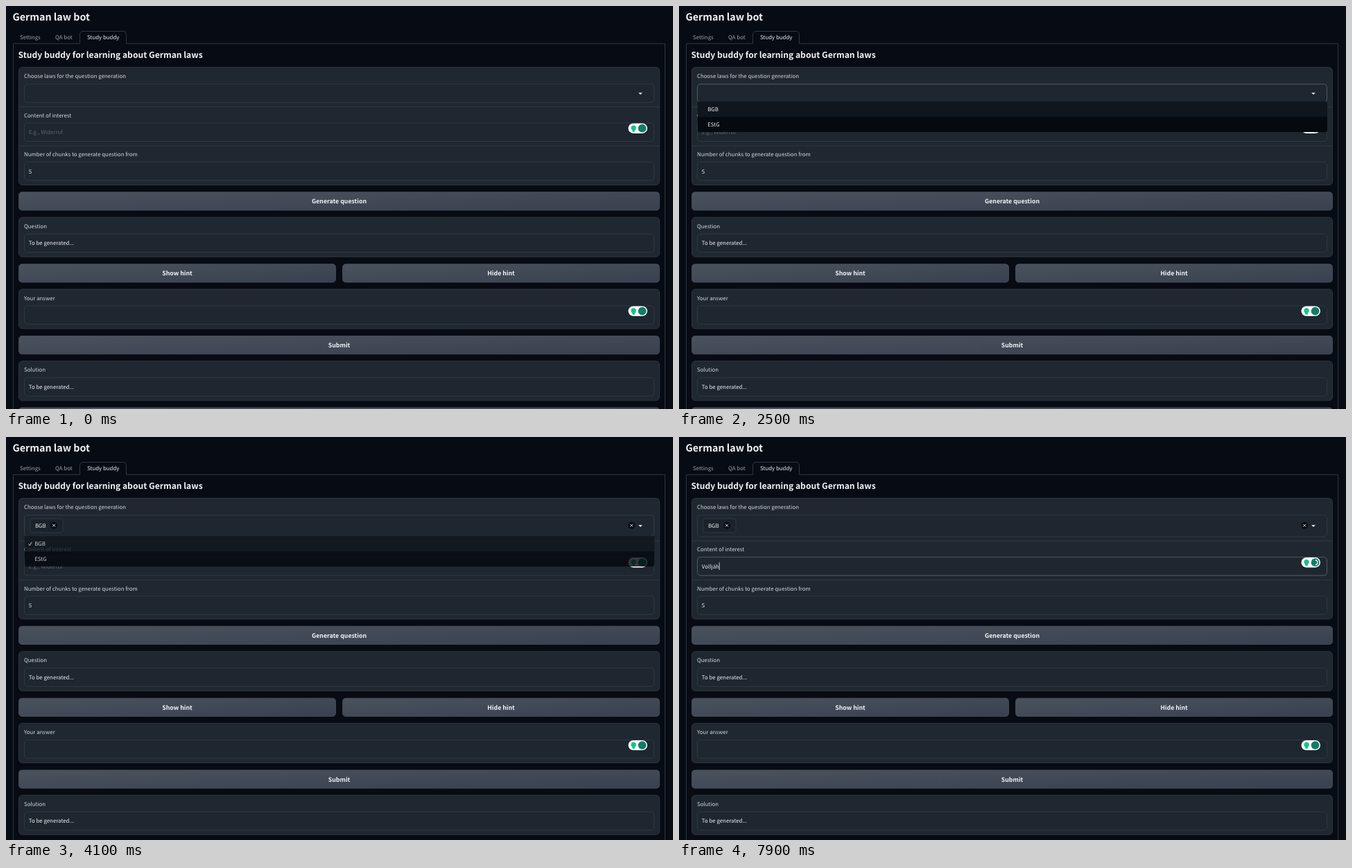
An HTML page that plays this animation: 962x582 px, repeating every 8000 ms.

```html
<!DOCTYPE html>
<html lang="en">
<head>
<meta charset="utf-8">
<title>German law bot</title>
<style>
  html, body { margin: 0; width: 100%; height: 100%; overflow: hidden; background: #070b14; }
  svg { display: block; width: 100vw; height: 100vh; }
  text {
    font-family: "Noto Sans CJK JP", "Noto Sans CJK SC", "Noto Sans CJK KR", "Noto Sans CJK TC", "Noto Sans CJK", "Noto Sans", sans-serif;
    font-size: 7.86px; fill: #eceef1; text-rendering: geometricPrecision; white-space: pre;
  }
  .label { fill: #d3d6db; }
  .muted { fill: #9aa1ac; }
  .hint { fill: #5d646e; }
  .bold { font-weight: 700; fill: #f1f3f5; }
  .mid { text-anchor: middle; font-size: 8.78px; }
</style>
</head>
<body>
<svg id="stage" viewBox="0 0 962 582" xmlns="http://www.w3.org/2000/svg">
  <defs>
    <linearGradient id="btn" x1="0" y1="0" x2="1" y2="1">
      <stop offset="0" stop-color="#4a525d"/>
      <stop offset="1" stop-color="#394150"/>
    </linearGradient>
  </defs>
</svg>
<script>
const NS = 'http://www.w3.org/2000/svg';
const stage = document.getElementById('stage');
const LOOP = 8000, STEP = 100;
const SHIFT = 4.5;
const BLOCK = '#1f2730', FIELD = '#1e262f', LINE = '#353d48', FOCUS = '#566070';
const LEFT = 18.5, WIDTH = 924, FIELD_X = 26.5, FIELD_W = 908, FIELD_H = 26.5;

function add(parent, tag, attrs = {}, content) {
  const node = document.createElementNS(NS, tag);
  set(node, attrs);
  if (content !== undefined) node.textContent = content;
  parent.appendChild(node);
  return node;
}
function set(node, attrs) {
  for (const key in attrs) node.setAttribute(key, attrs[key]);
}
const show = (node, on) => set(node, { visibility: on ? 'visible' : 'hidden' });
const group = (parent = stage) => add(parent, 'g');
const text = (parent, x, y, content, cls = '') => add(parent, 'text', { x, y, class: cls }, content);
const box = (parent, x, y, width, height, rx, fill, stroke = LINE) =>
  add(parent, 'rect', { x, y, width, height, rx, fill, stroke, 'stroke-width': 0.8 });
const field = (parent, y) => box(parent, FIELD_X, y, FIELD_W, FIELD_H, 4.5, FIELD);
const focusRing = (parent, y, height) => box(parent, FIELD_X, y, FIELD_W, height, 4.5, 'none', FOCUS);
const caret = (parent, y) => add(parent, 'rect', { y, width: 0.9, height: 11, fill: '#d5d8dc' });

function button(parent, x, y, width, label) {
  box(parent, x, y, width, 26.3, 4.5, 'url(#btn)', '#48505b');
  text(parent, x + width / 2, y + 16.6, label, 'bold mid');
}

function card(parent, y, label, value) {
  box(parent, LEFT, y, WIDTH, 57, 5, BLOCK);
  text(parent, 26, y + 15.6, label, 'label');
  field(parent, y + 24);
  text(parent, 32.8, y + 40.1, value);
}

// Writing helper badge: bulb and a plain round mark
function badge(parent, y) {
  const g = add(parent, 'g', { transform: `translate(897.5 ${y})` });
  add(g, 'rect', { width: 27.5, height: 14.4, rx: 7.2, fill: '#fff' });
  add(g, 'circle', { cx: 7.6, cy: 6.6, r: 3.7, fill: '#17c08f' });
  add(g, 'rect', { x: 5.9, y: 9.4, width: 3.4, height: 2.9, rx: 0.8, fill: '#17c08f' });
  add(g, 'circle', { cx: 20.1, cy: 7.2, r: 5.9, fill: '#107d67' });
  return g;
}

function closeDot(parent, x, y) {
  add(parent, 'circle', { cx: x, cy: y, r: 5, fill: '#070b13' });
  add(parent, 'path', {
    d: `M${x - 2} ${y - 2}l4 4m0 -4l-4 4`, stroke: '#f0f2f4', 'stroke-width': 0.9
  });
}

// Header and tabs
add(stage, 'rect', { width: 962, height: 582, fill: '#070b14' });
add(text(stage, 9.4, 20.6, 'German law bot', 'bold'), 'title').remove();
stage.lastChild.style.fontSize = '14.3px';
add(stage, 'path', {
  d: 'M10.5 590V54.3H106.5V41a4.5 4.5 0 0 1 4.5 -4.5H169a4.5 4.5 0 0 1 4.5 4.5V54.3H950.5V590',
  fill: 'none', stroke: LINE, 'stroke-width': 0.9
});
text(stage, 20, 48.2, 'Settings', 'muted');
text(stage, 71, 48.2, 'QA bot', 'muted');
text(stage, 117, 48.2, 'Study buddy');
text(stage, 17.6, 74.6, 'Study buddy for learning about German laws', 'bold').style.fontSize = '12.1px';

// First form
const form = box(stage, LEFT, 88.5, WIDTH, 170, 5, BLOCK);
text(stage, 26, 104, 'Choose laws for the question generation', 'label');
const picker = field(stage, 112.8);
const pickerRing = focusRing(stage, 112.8, FIELD_H);
const arrow = add(stage, 'path', { d: 'M912.2 125.2h5.6l-2.8 2.9z', fill: '#f0f2f4' });
const chosen = group();
box(chosen, 35, 118, 47, 20, 3, '#1a222b');
text(chosen, 41.9, 130.9, 'BGB');
closeDot(chosen, 69, 127.7);
closeDot(chosen, 902.3, 127.7);
const pickerCaret = caret(stage, 120.2);

// Everything below the picker moves down once a law is chosen
const lower = group();
for (const y of [145.6, 202]) {
  add(lower, 'path', { d: `M${LEFT} ${y}h${WIDTH}`, stroke: LINE, 'stroke-width': 0.8 });
}
text(lower, 26, 160.8, 'Content of interest', 'label');
field(lower, 169);
const topicRing = focusRing(lower, 169, FIELD_H);
const placeholder = text(lower, 32.8, 185.2, 'E.g., Widerruf', 'hint');
const topic = text(lower, 32.8, 185.2, '');
const topicCaret = caret(lower, 176.6);
const topicBadge = badge(lower, 169.5);
const spinner = add(topicBadge, 'path', {
  d: 'M20.1 3.9a3.3 3.3 0 0 1 0 6.6', fill: 'none', stroke: '#fff', 'stroke-width': 1.2
});
text(lower, 26, 217.3, 'Number of chunks to generate question from', 'label');
field(lower, 225.3);
text(lower, 32.8, 241.6, '5');

button(lower, LEFT, 268.7, WIDTH, 'Generate question');
card(lower, 305.2, 'Question', 'To be generated...');
button(lower, LEFT, 372.7, 457, 'Show hint');
button(lower, 485.5, 372.7, 457, 'Hide hint');
card(lower, 409, 'Your answer', '');
badge(lower, 433.4);
button(lower, LEFT, 476.5, WIDTH, 'Submit');
card(lower, 512.8, 'Solution', 'To be generated...');
button(lower, LEFT, 580, WIDTH, '');

// Option list
const ROW = 21.9;
const list = group();
add(list, 'rect', { x: 27, y: 138.3, width: 908, height: 2 * ROW, rx: 2.5, fill: '#050910' });
add(list, 'rect', { x: 27, y: 138.3, width: 908, height: ROW, fill: '#10161e' });
const tick = add(list, 'path', {
  d: 'M32.6 149.5l1.7 2.1l3 -5', fill: 'none', stroke: '#eceef1', 'stroke-width': 1
});
text(list, 41.2, 152.1, 'BGB');
text(list, 41.2, 152.1 + ROW, 'EStG');

const clamp = v => Math.max(0, Math.min(1, v));
const ramp = (t, from, to) => clamp((t - from) / (to - from));
const within = (t, from, to) => t >= from && t < to;

const WORD = 'Volljäh';
const KEYS = [[5600, 1], [6100, 3], [6200, 4], [6500, 5], [7000, 6], [7500, 7]];
const typedCount = t => KEYS.reduce((n, [at, count]) => t >= at ? count : n, 0);
let typed = -1;

function draw(t) {
  const picked = t >= 3100;
  const shift = picked ? SHIFT : 0;
  const half = picked ? 1.9 : 0;
  set(lower, { transform: `translate(0 ${shift})` });
  set(form, { height: 170 + shift });
  set(picker, { height: FIELD_H + shift });
  set(pickerRing, {
    height: FIELD_H + shift,
    opacity: ramp(t, 1660, 1860) * (1 - ramp(t, 3980, 4130))
  });
  set(arrow, { transform: `translate(0 ${half})` });
  show(chosen, picked);

  set(pickerCaret, { x: picked ? 89.9 : 37, transform: `translate(0 ${half})` });
  show(pickerCaret, within(t, 1700, 2200) || within(t, 3100, 3700));

  // The list fades and slides away with a cubic ease
  const gone = ramp(t, 3985, 4185) ** 3;
  show(list, within(t, 2500, 4200));
  show(tick, picked && t < 4200);
  set(list, { opacity: 1 - gone, transform: `translate(0 ${(picked ? 4.4 : 0) + gone * 3.1})` });

  const count = typedCount(t);
  if (count !== typed) {
    topic.textContent = WORD.slice(0, count);
    set(topicCaret, { x: 32.7 + (count ? topic.getComputedTextLength() : 0) });
    typed = count;
  }
  show(placeholder, count === 0);
  set(topicRing, { opacity: ramp(t, 4760, 4900) });
  show(topicCaret, within(t, 4800, 5400) || t >= 5600);
  show(spinner, t >= 7200);
  set(spinner, { transform: `rotate(${(t - 7900) * 0.45} 20.1 7.2)` });
}

function tick60() {
  const t = performance.now() % LOOP;
  draw(Math.floor(t / STEP) * STEP);
  requestAnimationFrame(tick60);
}
tick60();
</script>
</body>
</html>
```
